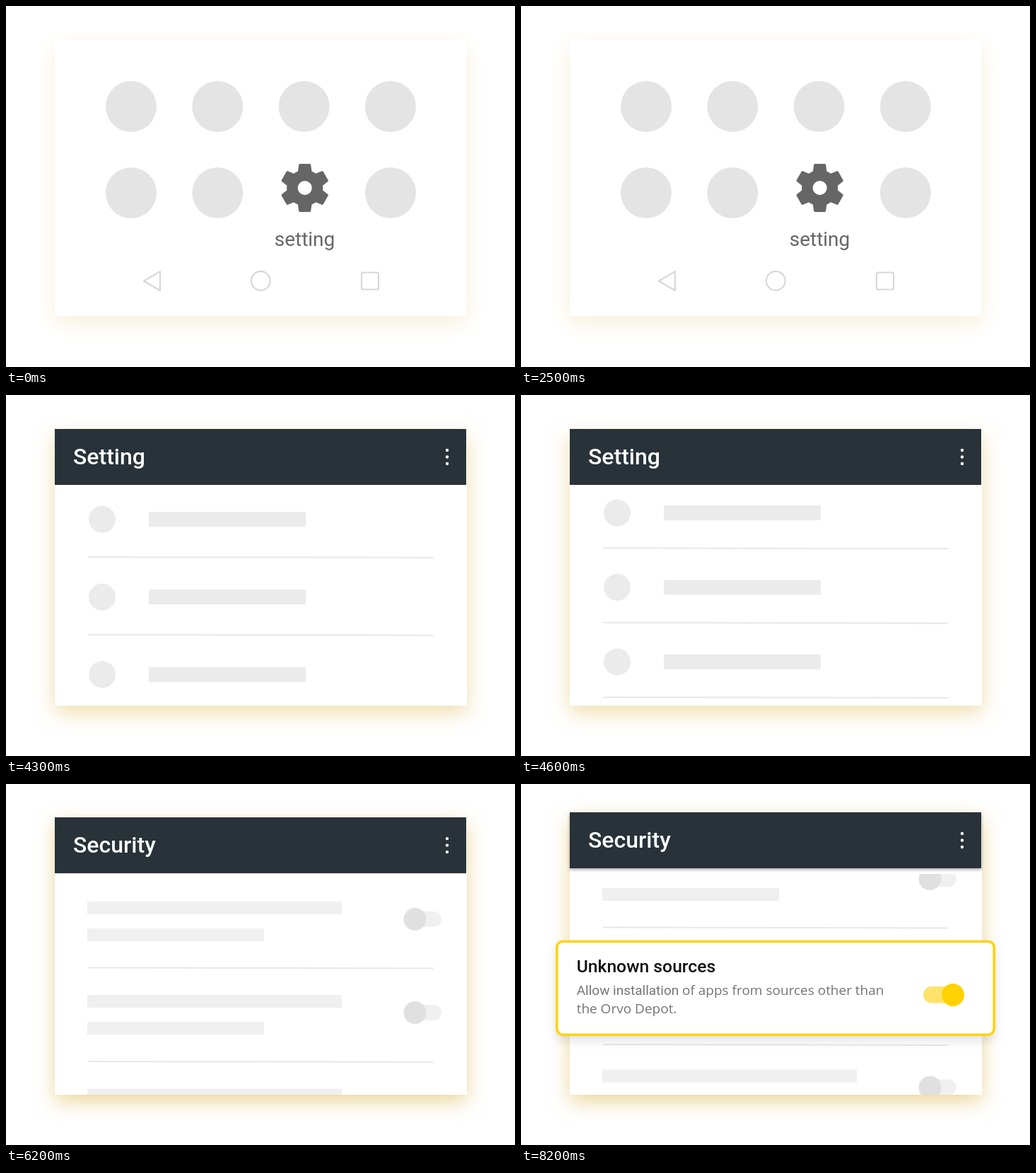
An HTML page for the animation above (8600 ms loop, 720 by 510 pixels).

```html
<!DOCTYPE html>
<html lang="en">
<head>
<meta charset="utf-8">
<title>Allow unknown sources</title>
<style>
  html, body { margin: 0; height: 100%; overflow: hidden; background: #fff; }
  svg { display: block; width: 100vw; height: 100vh; }
  text { font-family: Roboto, sans-serif; }
  .bar-title { font-size: 32px; font-weight: 500; fill: #fff; }
  .label { font-size: 28px; fill: #666; text-anchor: middle; }
  .card-title { font-size: 20.8px; font-weight: 500; fill: #111; }
  .card-body { font-size: 16px; fill: #757575; }
  .wide { font-family: "Open Sans", sans-serif; }
  .nav { fill: none; stroke: #d8d8d8; stroke-width: 2.2; stroke-linejoin: round; }
  .rule { stroke: #e8e8e8; stroke-width: 2; }
  .card { fill: #fff; stroke: #fed30a; stroke-width: 3; filter: drop-shadow(0 6px 6px rgba(50, 40, 60, .13)); }
</style>
</head>
<body>
<svg id="stage" viewBox="0 0 720 510">
  <defs>
    <clipPath id="list"><rect x="69" y="127" width="583" height="312"/></clipPath>
  </defs>
  <g id="scene"></g>
</svg>
<script>
const LOOP = 8600;
const GEAR = 'M19.14 12.94c.04-.3.06-.61.06-.94 0-.32-.02-.64-.07-.94l2.03-1.58c.18-.14.23-.41.12-.61' +
  'l-1.92-3.32c-.12-.22-.37-.29-.59-.22l-2.39.96c-.5-.38-1.03-.7-1.62-.94l-.36-2.54c-.04-.24-.24-.41-.48-.41' +
  'h-3.84c-.24 0-.43.17-.47.41l-.36 2.54c-.59.24-1.13.57-1.62.94l-2.39-.96c-.22-.08-.47 0-.59.22' +
  'L2.74 8.87c-.12.21-.08.47.12.61l2.03 1.58c-.05.3-.09.63-.09.94s.02.64.07.94l-2.03 1.58' +
  'c-.18.14-.23.41-.12.61l1.92 3.32c.12.22.37.29.59.22l2.39-.96c.5.38 1.03.7 1.62.94l.36 2.54' +
  'c.05.24.24.41.48.41h3.84c.24 0 .44-.17.47-.41l.36-2.54c.59-.24 1.13-.56 1.62-.94l2.39.96' +
  'c.22.08.47 0 .59-.22l1.92-3.32c.12-.22.07-.47-.12-.61z';

const circle = (x, y, r, fill) => `<circle cx="${x}" cy="${y}" r="${r}" fill="${fill}"/>`;
const rect = (x, y, w, h, fill, more = '') =>
  `<rect x="${x}" y="${y}" width="${w}" height="${h}" fill="${fill}" ${more}/>`;
const text = (x, y, cls, str) => `<text x="${x}" y="${y}" class="${cls}">${str}</text>`;
const rule = y => `<path class="rule" d="M116 ${y - .4}L604.5 ${y + .4}"/>`;
const clip = body => `<g clip-path="url(#list)">${body}</g>`;
const each = (n, fn) => Array.from({ length: n }, (_, i) => fn(i)).join('');
const mix = (a, b, t) => a + (b - a) * t;

const panel = (top, w, bottom, glow) => rect(69, top, w, bottom - top, '#fff',
  `style="filter:drop-shadow(0 10px 14px rgba(222,190,95,${glow}))"`);

const header = (top, title, shade = 0) =>
  rect(69, top, 582, 79, '#283238', `style="filter:drop-shadow(0 2px 2px rgba(0,0,0,${.35 * shade}))"`) +
  text(95, top + 50, 'bar-title', title) +
  each(3, i => circle(624, top + 30 + i * 9.5, 2.2, '#fff'));

const card = (cy, scale, body) =>
  `<g transform="translate(360 ${cy}) scale(${scale})">
    <rect class="card" x="-260.5" y="-55.5" width="521" height="111" rx="7"/>${body}</g>`;

const toggle = (y, x = 578.5) =>
  rect(x - 14, y - 11, 51.5, 22, '#f0f0f0', 'rx="11"') + circle(x, y, 16, '#e0e0e0');

function home(lit) {
  const dots = each(8, i => i === 6 ? '' : circle(177 + (i % 4) * 122.3, i < 4 ? 142 : 264, 36, '#e4e4e4'));
  return panel(48, 582, 438, .24) + dots +
    `<g opacity="${lit ? 1 : .2}">
      <path d="${GEAR}" fill="#666" transform="translate(422.7 257) scale(3.55) translate(-12 -12)"/>
      ${circle(422.7, 257, 10, '#fff')}${text(422.5, 338.5, 'label', 'setting')}
    </g>
    <g class="nav"><path d="M195 388.5L218 375V402Z"/><circle cx="360.3" cy="388.3" r="13.4"/>
    <rect x="503" y="376.5" width="24" height="24" rx="2"/></g>`;
}

const settingRow = y => circle(136, y, 19, '#ebebeb') + rect(202, y - 10.5, 222, 21, '#ebebeb');

function settings(ms) {
  let rows, top = '';
  if (ms < 5400) {
    const t = Math.min(9, Math.floor((ms - 4000) / 100)) / 9;
    rows = each(3, i => settingRow(185 + 114 * i - (27.75 + 13.1 * i) * t) +
      rule(242 + 114 * i - (38 + 13 * i) * t));
  } else {
    const big = ms >= 5800, push = big ? 14 : 0;
    rows = settingRow(157.5 - push) + rule(204 - push) + rule(369 + push) + settingRow(418 + push);
    top = card(288, big ? 1.18 : .977, circle(-214, 0, 19, '#666') + text(-158, 7.5, 'card-title', 'Security'));
  }
  return panel(48, 583, 439, .52) + clip(rows) + header(48, 'Setting') + top;
}

const securityRow = y => rect(115, y, 360, 18, '#f0f0f0') + rect(115, y + 38, 250, 18, '#f0f0f0') + toggle(y + 25);

function security(ms) {
  const step = Math.min(8, Math.floor((ms - 6200) / 100));
  const t = step / 8, k = (step + 1) / 9, y = 48 - 8 * k;
  const rows = securityRow(mix(166, 109, t)) + rule(mix(260, 203, t)) +
    securityRow(mix(298, 253, t)) + rule(mix(392.3, 368.5, t)) + securityRow(mix(430.5, 403.5, t));
  let top = '';
  if (ms >= 7000) {
    const big = ms >= 7400;
    top = card(big ? 288.3 : 290, big ? 1.187 : 1,
      text(-237, -19, 'card-title', 'Unknown sources') +
      text(-237, 8, 'card-body', 'Allow installation <tspan class="wide">of apps from sources other than</tspan>') +
      text(-237, 30, 'card-body wide', 'the Orvo Depot.'));
  }
  if (ms >= 8200) top += rect(569, 286, 52, 23.5, '#fde36b', 'rx="11.7"') + circle(611, 298, 16, '#ffd204');
  else if (ms >= 7800) top += toggle(298, 580);
  return panel(y, 583, 439, .62) + clip(rows) + header(y, 'Security', k) + top;
}

function draw(ms) {
  if (ms < 4000) {
    const dim = ms >= 500 && ms < 1000 || ms >= 1500 && ms < 2500 || ms >= 3000 && ms < 3500;
    return home(!dim);
  }
  return ms < 6200 ? settings(ms) : security(ms);
}

const scene = document.getElementById('scene');
const start = performance.now();
let shown = -1;
function tick() {
  const ms = (performance.now() - start) % LOOP;
  const slot = Math.floor(ms / 100);
  if (slot !== shown) {
    shown = slot;
    scene.innerHTML = draw(slot * 100);
  }
  requestAnimationFrame(tick);
}
tick();
</script>
</body>
</html>
```
